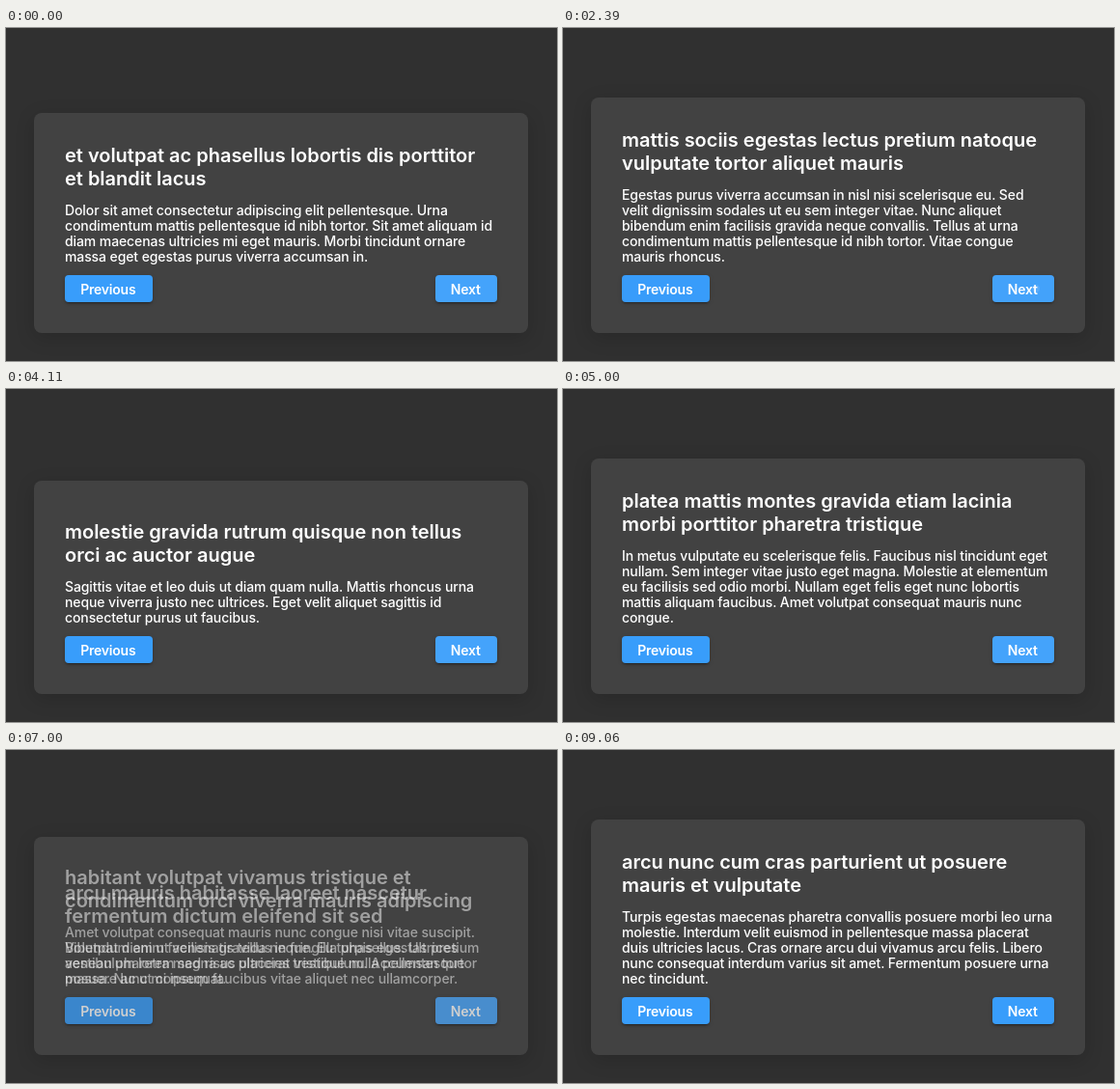
An HTML page for the animation above (9.62 s loop, 571 by 345 pixels).

```html
<!DOCTYPE html>
<html lang="la">
<head>
<meta charset="utf-8">
<title>Card stepper</title>
<style>
  html, body { margin: 0; width: 100%; height: 100%; overflow: hidden; background: #303030; }
  #stage { position: relative; width: 571px; height: 345px; overflow: hidden; color: #fff;
    font-family: Inter, "Liberation Sans", sans-serif; }
  #card { position: absolute; left: 29px; width: 512px; bottom: 29px; border-radius: 8px;
    background: #424242; box-shadow: 0 5px 20px rgba(0, 0, 0, .16); }
  .view { position: absolute; left: 61px; width: 448px; bottom: 61px; white-space: pre; }
  .title { font-size: 20px; line-height: 24px; font-weight: 600; letter-spacing: -.015px; }
  .text { margin: 13px 0 11px; font-size: 14px; line-height: 16px; font-weight: 500;
    letter-spacing: -.1px; }
  .bar { position: relative; height: 28px; }
  .btn { position: absolute; top: 0; height: 28px; border-radius: 4px; background: #389dfb;
    overflow: hidden; text-align: center; font-size: 14px; line-height: 30px; font-weight: 600;
    letter-spacing: -.22px; text-indent: -1.5px;
    box-shadow: 0 3px 1px -2px rgba(0,0,0,.2), 0 2px 2px rgba(0,0,0,.14), 0 1px 5px rgba(0,0,0,.12); }
  .prev { left: 0; width: 91px; }
  .next { right: 0; width: 64px; }
  .hover { position: absolute; inset: 0; background: rgba(255, 255, 255, .06); }
  .ripple { position: absolute; left: 45px; top: 14px; border-radius: 50%;
    transform: translate(-50%, -50%); background: rgba(255, 255, 255, .12); }
  .label { position: relative; }
</style>
</head>
<body>
<div id="stage"><div id="card"></div></div>
<script>
const LOOP = 9620, FADE = 300, RESIZE = 200, RIPPLE = 300;

// start: fade-in begins; press: pointer goes down on the previous view
const pages = [
  { start: -1000, press: -1000,
    title: `et volutpat ac phasellus lobortis dis porttitor
et blandit lacus`,
    text: `Dolor sit amet consectetur adipiscing elit pellentesque. Urna
condimentum mattis pellentesque id nibh tortor. Sit amet aliquam id
diam maecenas ultricies mi eget mauris. Morbi tincidunt ornare
massa eget egestas purus viverra accumsan in.` },
  { start: 220, press: 205,
    title: `ridiculus sed neque aenean duis bibendum
gravida vitae nec nisi`,
    text: `Dolor sed viverra ipsum nunc aliquet. Eget nunc lobortis mattis
aliquam faucibus purus in massa. Sit amet facilisis magna etiam
tempor orci eu lobortis.` },
  { start: 1000, press: 900,
    title: `faucibus laoreet pulvinar mi mollis eleifend
ante fermentum faucibus integer`,
    text: `Pharetra convallis posuere morbi. Dignissim diam quis enim laoreet
suspendisse interdum consectetur. Amet consectetur sed diam.
phasellus vestibulum lorem sed risus ultricies tristique.` },
  { start: 1660, press: 1480,
    title: `mattis sociis egestas lectus pretium natoque
vulputate tortor aliquet mauris`,
    text: `Egestas purus viverra accumsan in nisl nisi scelerisque eu. Sed
velit dignissim sodales ut eu sem integer vitae. Nunc aliquet
bibendum enim facilisis gravida neque convallis. Tellus at urna
condimentum mattis pellentesque id nibh tortor. Vitae congue
mauris rhoncus.` },
  { start: 2390, press: 2370,
    title: `semper dictumst viverra quam lacinia nullam
ornare cursus sit habitasse`,
    text: `Aliquam sem et tortor consequat id porta nibh. Amet porttitor
eget dolor morbi non arcu risus quis varius. Lectus magna
fringilla urna porttitor rhoncus dolor purus. Ut tristique et
egestas quis ipsum suspendisse ultrices gravida. Massa enim
nec dui nunc.` },
  { start: 2920, press: 2910,
    title: `faucibus turpis nunc interdum suspendisse
adipiscing aliquam proin vivamus tempor`,
    text: `Amet dictum sit amet justo donec. Sed vulputate odio ut enim
blandit volutpat maecenas volutpat. Dictum non consectetur a erat
nam at lectus urna duis. Faucibus ornare suspendisse sed nisi.
Posuere lorem ipsum dolor sit amet consectetur adipiscing elit duis.` },
  { start: 3720, press: 3700,
    title: `molestie gravida rutrum quisque non tellus
orci ac auctor augue`,
    text: `Sagittis vitae et leo duis ut diam quam nulla. Mattis rhoncus urna
neque viverra justo nec ultrices. Eget velit aliquet sagittis id
consectetur purus ut faucibus.` },
  { start: 4690, press: 4590,
    title: `platea mattis montes gravida etiam lacinia
morbi porttitor pharetra tristique`,
    text: `In metus vulputate eu scelerisque felis. Faucibus nisl tincidunt eget
nullam. Sem integer vitae justo eget magna. Molestie at elementum
eu facilisis sed odio morbi. Nullam eget felis eget nunc lobortis
mattis aliquam faucibus. Amet volutpat consequat mauris nunc
congue.` },
  { start: 5400, press: 5310,
    title: `turpis egestas eget cursus lorem lectus
dignissim est quis habitasse`,
    text: `Ultrices dui sapien eget mi proin sed libero. Sit amet aliquam id
diam maecenas ultricies mi eget mauris. Sit amet tellus cras
adipiscing enim eu turpis. Dui ut ornare. Quam nulla porttitor massa
id. Semper feugiat nibh sed pulvinar proin gravida hendrerit lectus
a.` },
  { start: 5975, press: 5920,
    title: `arcu mauris habitasse laoreet nascetur
fermentum dictum eleifend sit sed`,
    text: `Bibendum enim facilisis gravida neque. Eu turpis egestas pretium
aenean pharetra magna ac placerat vestibulum. Accumsan tortor
posuere ac ut consequat.` },
  { start: 6850, press: 6760,
    title: `habitant volutpat vivamus tristique et
condimentum orci viverra mauris adipiscing`,
    text: `Amet volutpat consequat mauris nunc congue nisi vitae suscipit.
Volutpat diam ut venenatis tellus in fringilla phasellus. Ultrices
vestibulum lorem sed risus ultricies tristique nulla pellentesque
massa. Nunc mi ipsum faucibus vitae aliquet nec ullamcorper.` },
  { start: 7470, press: 7320,
    title: `faucibus mus dictumst quis ante interdum
aliquam facilisi tempor venenatis`,
    text: `Non curabitur gravida arcu ac tortor dignissim. Pulvinar etiam non
quam lacus. Velit sed ullamcorper morbi tincidunt ornare massa.
Viverra maecenas accumsan lacus vel facilisis volutpat est velit.` },
  { start: 8260, press: 8240,
    title: `arcu nunc cum cras parturient ut posuere
mauris et vulputate`,
    text: `Turpis egestas maecenas pharetra convallis posuere morbi leo urna
molestie. Interdum velit euismod in pellentesque massa placerat
duis ultricies lacus. Cras ornare arcu dui vivamus arcu felis. Libero
nunc consequat interdum varius sit amet. Fermentum posuere urna
nec tincidunt.` }
];

const stage = document.getElementById('stage');
const card = document.getElementById('card');
const clamp = x => Math.max(0, Math.min(1, x));
const ease = x => (1 - Math.cos(Math.PI * clamp(x))) / 2;

function add(parent, cls, text = '') {
  const el = document.createElement('div');
  el.className = cls;
  el.textContent = text;
  parent.append(el);
  return el;
}

for (const p of pages) {
  p.view = add(stage, 'view');
  add(p.view, 'title', p.title);
  add(p.view, 'text', p.text);
  const bar = add(p.view, 'bar');
  add(bar, 'btn prev', 'Previous');
  const next = add(bar, 'btn next');
  p.hover = add(next, 'hover');
  p.ripple = add(next, 'ripple');
  add(next, 'label', 'Next');
  p.height = 164 + 16 * p.text.split('\n').length;
}

// The card grows as a taller page fades in, and shrinks once a taller one is gone.
function cardHeight(i, t) {
  const to = pages[i].height;
  if (!i) return to;
  const from = pages[i - 1].height;
  const begin = pages[i].start + (to < from ? FADE : 0);
  return from + (to - from) * ease((t - begin) / RESIZE);
}

function draw(t) {
  const cur = pages.findLastIndex(p => t >= p.start);
  const mix = clamp((t - pages[cur].start) / FADE);
  card.style.height = cardHeight(cur, t) + 'px';
  pages.forEach((p, i) => {
    const alpha = i === cur ? mix : i === cur - 1 ? 1 - mix : 0;
    p.view.style.opacity = alpha;
    p.view.style.visibility = alpha ? 'visible' : 'hidden';
    p.hover.style.opacity = 1 - clamp((t - 8900) / 150);
    const after = pages[i + 1];
    const size = after ? 116 * clamp((t - after.press) / RIPPLE) : 0;
    p.ripple.style.width = p.ripple.style.height = size + 'px';
  });
}

const origin = performance.now();
function tick() {
  draw((performance.now() - origin) % LOOP);
  requestAnimationFrame(tick);
}
tick();
</script>
</body>
</html>
```
